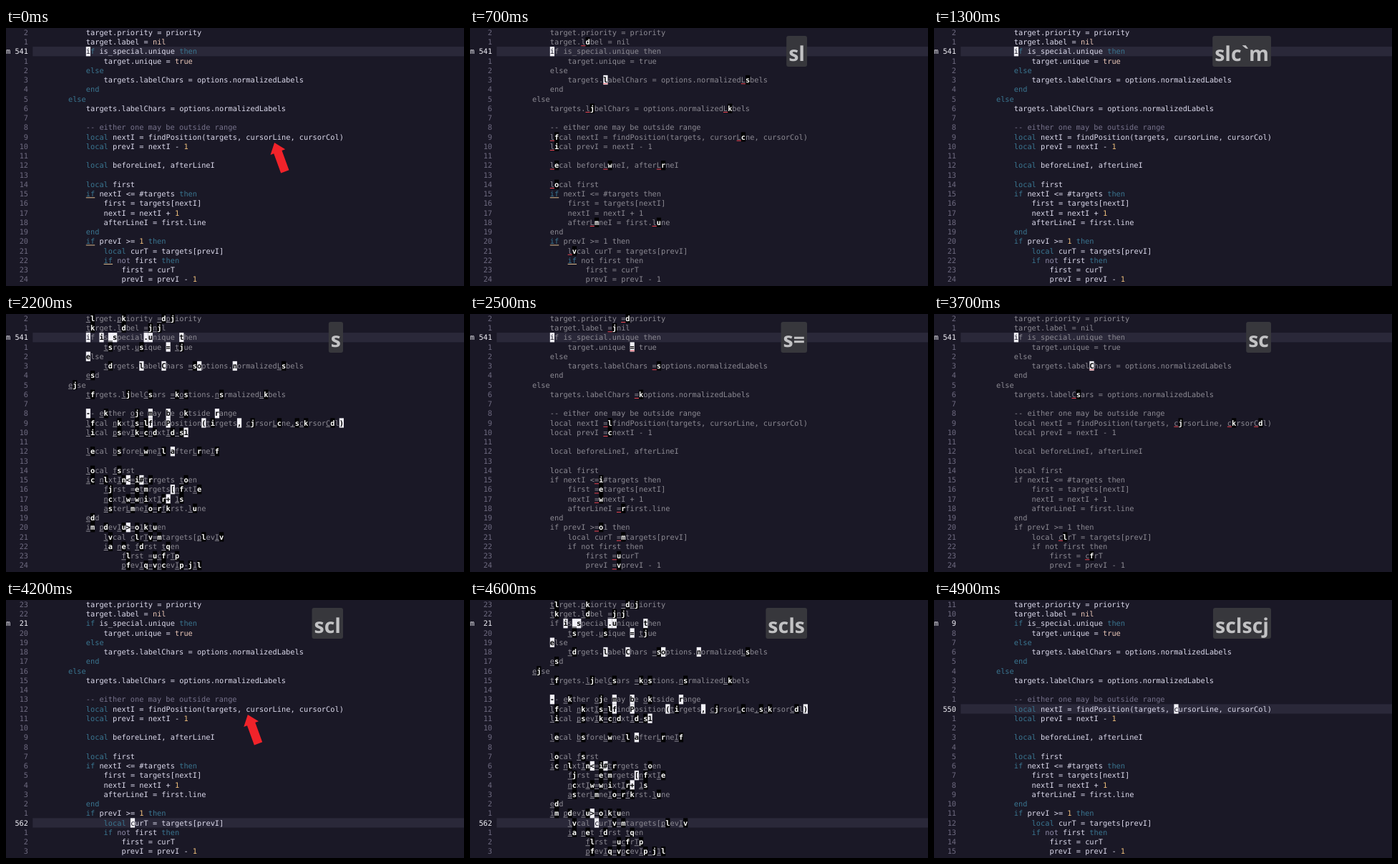
An HTML page with a canvas that plays this animation: 640 by 360 pixels, repeating every 5000 ms.

```html
<!DOCTYPE html>
<html lang="en">
<head>
<meta charset="utf-8">
<title>Label jumps in an editor</title>
<style>
html, body { margin: 0; width: 100%; height: 100%; overflow: hidden; background: #1a1826; }
canvas { display: block; width: 640px; height: 360px; }
</style>
</head>
<body>
<canvas id="stage" width="640" height="360"></canvas>
<script>
const ctx = document.getElementById('stage').getContext('2d');
const CW = 6.21, LH = 13.25, TOP = -0.4, LOOP = 5000, FIRST_LINE = 539;
const MONO = '10.315px "DejaVu Sans Mono", monospace';
const C = {
  bg: '#1a1826', bar: '#2a2839', text: '#dcdaec', dim: '#8c8a93', num: '#6e6a80',
  keyword: '#3a7691', op: '#908caa', value: '#ebc8b8', digit: '#f0c07c',
  comment: '#77738c', red: '#e8434f', white: '#f2f1f8', panel: '#37373c'
};

// [column, code, the same line with jump labels]; * marks a direct jump
const rows = [
  [18, 'target.priority = priority', 'tlrget.pkiority =dpjiority'],
  [18, 'target.label = nil', 'tkrget.ldbel =jnjl'],
  [18, 'if is_special.unique then', 'if *s**pecial**nique *hen'],
  [22, 'target.unique = true', 'tsrget.usique * tjue'],
  [18, 'else', '*lse'],
  [22, 'targets.labelChars = options.normalizedLabels', 'tdrgets.*abel*hars =s*ptions.*ormalizedLsbels'],
  [18, 'end', 'esd'],
  [14, 'else', 'ejse'],
  [18, 'targets.labelChars = options.normalizedLabels', 'tfrgets.ljbelCsars =kostions.nsrmalizedLkbels'],
  [18, '', ''],
  [18, '-- either one may be outside range', '*- ekther oje *ay *e oktside *ange'],
  [18, 'local nextI = findPosition(targets, cursorLine, cursorCol)', 'lfcal nkxtIs=l*ind*osition*tirgets* cjrsorLcne,sckrsorCdl*'],
  [18, 'local prevI = nextI - 1', 'lical psevIk=cndxtId-s*'],
  [18, '', ''],
  [18, 'local beforeLineI, afterLineI', 'lecal bsforeLwneIl *fterLrneIf'],
  [18, '', ''],
  [18, 'local first', 'lOcal fsrst'],
  [18, 'if nextI <= #targets then', 'ic nlxtIn*=i*trrgets toen'],
  [22, 'first = targets[nextI]', 'fjrst =etmrgets*nfxtIe'],
  [22, 'nextI = nextI + 1', 'ncxtIw=wnixtIr* 1s'],
  [22, 'afterLineI = first.line', 'asterLmneIo=rfkrst.lune'],
  [18, 'end', 'edd'],
  [18, 'if prevI >= 1 then', 'im pdevIu*=o1ktuen'],
  [22, 'local curT = targets[prevI]', 'lvcal clrTv=mtargets[plevIv'],
  [22, 'if not first then', 'ia net fdrst tqen'],
  [26, 'first = curT', 'flrst =ucfrTp'],
  [26, 'prevI = prevI - 1', 'pfevIq=vpcevIp-j1l']
];

const MARK_ROW = 2;
const home = [2, 18], part = [11, 60], equals = [11, 30], curT = [23, 28], word = [11, 54];

// start, typed keys, cursor, search ('' = any character), arrow target
const steps = [
  [0, '', home, null, part],
  [400, '', home],
  [500, 's', home, ''],
  [700, 'sl', home, 'l'],
  [1000, 'slc', part],
  [1300, 'slc`m', home],
  [1500, 'slc`m', home, null, equals],
  [1900, '', home, null, equals],
  [2000, '', home],
  [2100, 's', home, ''],
  [2400, 's=', home, '='],
  [2700, 's=l', equals],
  [2900, 's=l`m', home],
  [3000, 's=l`m', home, null, curT],
  [3400, '', home],
  [3500, 's', home, ''],
  [3700, 'sc', home, 'c'],
  [3900, 'scl', curT],
  [4100, 'scl', curT, null, word],
  [4500, 'scls', curT, ''],
  [4700, 'sclsc', curT, 'c'],
  [4900, 'sclscj', word]
];

const rules = [
  [/^--.*/, C.comment],
  [/^(local|if|then|else|end)\b/, C.keyword],
  [/^not\b/, C.op],
  [/^(nil|true)\b/, C.value],
  [/^\d+/, C.digit],
  [/^(\w+|\s+|.)/, C.text]
];

function tokens(code) {
  const out = [];
  for (let at = 0; at < code.length;) {
    for (const [re, color] of rules) {
      const hit = re.exec(code.slice(at));
      if (!hit) continue;
      out.push([at, hit[0], color]);
      at += hit[0].length;
      break;
    }
  }
  return out;
}
const parsed = rows.map(r => tokens(r[1]));

function box(row, col, color) {
  ctx.fillStyle = color;
  ctx.fillRect(col * CW, TOP + row * LH, CW, LH);
}
function write(row, col, text, color, bold) {
  ctx.font = (bold ? 'bold ' : '') + MONO;
  ctx.fillStyle = color;
  ctx.fillText(text, col * CW, TOP + row * LH + 10.2);
}
function underline(row, col, n, color) {
  ctx.fillStyle = color;
  ctx.fillRect(col * CW, TOP + row * LH + 11.4, n * CW, 1);
}
function cell(row, col, ch, bg, fg, bold) {
  box(row, col, bg);
  write(row, col, ch, fg, bold);
}

function drawLabels(row, find, cursor) {
  const [col, code, marks] = rows[row];
  const wanted = ch => find === '' || ch.toLowerCase() === find;
  const line = find ? C.red : C.dim;
  for (let i = 0; i < marks.length; i++) {
    const x = col + i;
    if (marks[i] === '*') {
      if (!wanted(code[i])) continue;
      cell(row, x, code[i], C.white, '#000', true);
      if (find) underline(row, x, 1, line);
    } else if (marks[i] !== code[i] && wanted(code[i - 1])) {
      if (row === cursor[0] && x === cursor[1] + 1) continue;
      cell(row, x, marks[i].toLowerCase(), '#000', '#fff', true);
      underline(row, x - 1, 1, line);
    }
  }
}

function drawArrow([row, col]) {
  const down = row > 20;
  ctx.save();
  ctx.translate(col * CW + 2.5, TOP + (row + 0.5) * LH + (down ? -6 : 8));
  ctx.rotate((down ? 160 : -20) * Math.PI / 180);
  ctx.beginPath();
  for (const [x, y] of [[0, 0], [11, 14], [6, 14], [6, 43], [-6, 43], [-6, 14], [-11, 14]]) ctx.lineTo(x, y);
  ctx.fillStyle = '#f0232a';
  ctx.fill();
  ctx.restore();
}

function drawKeys(keys) {
  ctx.font = '600 28.5px "Noto Sans", sans-serif';
  const w = ctx.measureText(keys).width + 6;
  ctx.fillStyle = C.panel;
  ctx.beginPath();
  ctx.roundRect(471 - w, 11, w, 43, 3);
  ctx.fill();
  ctx.fillStyle = '#c2c2c4';
  ctx.fillText(keys, 474 - w, 45.5);
}

function draw(t) {
  const [, keys, cursor, find = null, arrow] = steps.findLast(s => s[0] <= t);
  const searching = find !== null, sameWord = t < 1000;
  ctx.fillStyle = C.bg;
  ctx.fillRect(0, 0, 640, 360);
  ctx.fillStyle = C.bar;
  ctx.fillRect(6 * CW, TOP + cursor[0] * LH, 640, LH);

  rows.forEach(([col, code], row) => {
    const here = row === cursor[0], marked = row === MARK_ROW;
    const num = String(here ? FIRST_LINE + row : Math.abs(row - cursor[0]));
    write(row, 5 - num.length, num, here || marked ? C.white : C.num);
    if (marked) write(row, 0, 'm', C.white);
    for (const [at, text, color] of parsed[row]) {
      const twin = sameWord && text === 'if' && !here;
      write(row, col + at, text, searching && !twin ? C.dim : color);
      if (twin) underline(row, col + at, 2, '#d9b98c');
    }
    if (searching) drawLabels(row, find, cursor);
    if (here) cell(row, cursor[1], code[cursor[1] - col], C.white, '#1a1826');
  });

  if (arrow) drawArrow(arrow);
  if (keys) drawKeys(keys);
}

ctx.textRendering = 'geometricPrecision';
const start = performance.now();
function tick() {
  draw((performance.now() - start) % LOOP);
  requestAnimationFrame(tick);
}
tick();
</script>
</body>
</html>
```
